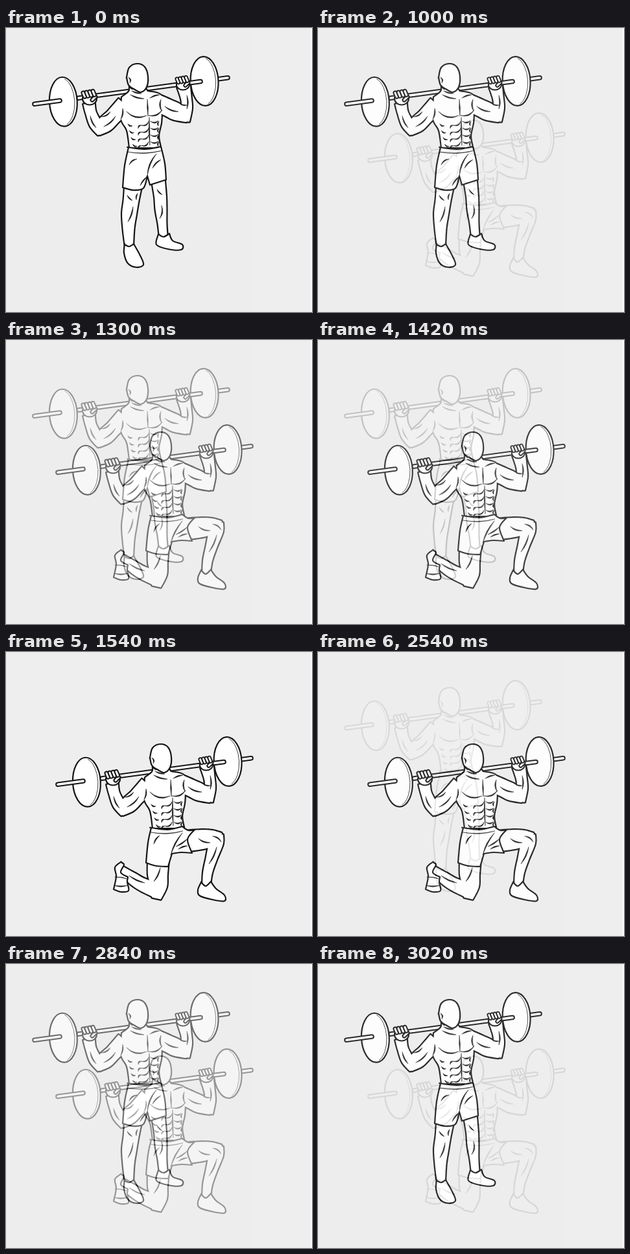
An HTML page that plays this animation: 472x438 px, repeating every 3080 ms.

```html
<!DOCTYPE html>
<html lang="en">
<head>
<meta charset="utf-8">
<title>Barbell lunge</title>
<style>
  html, body { margin: 0; width: 100%; height: 100%; overflow: hidden; background: #fff; }
  svg { display: block; width: 100%; height: 100%; }
</style>
</head>
<body>
<svg id="stage" viewBox="0 0 472 438" stroke-linecap="round" stroke-linejoin="round"></svg>
<script>
const LOOP = 3080, HOLD = 1000, STEP = 60, STEPS = 10, BACK = 2540;
const INK = '#161616', LINE = 2.2;

const parse = text => text.trim().split(/\s+/).map(p => p.split(',').map(Number));
const fixed = v => v.toFixed(1);

// Smooth path through points, continuing from the first one.
function through(pts) {
  return pts.slice(1).map((c, i) => {
    const b = pts[i], a = pts[i - 1] || b, d = pts[i + 2] || c;
    const c1 = b.map((v, k) => fixed(v + (c[k] - a[k]) / 6));
    const c2 = c.map((v, k) => fixed(v - (d[k] - b[k]) / 6));
    return `C${c1} ${c2} ${c.map(fixed)}`;
  }).join('');
}

// Closed outline through key points; "/" marks a sharp corner.
function outline(text) {
  const parts = text.split('/').map(parse);
  let last = parts[0][0], path = 'M' + last;
  for (const part of parts) {
    path += through([last, ...part]);
    last = part[part.length - 1];
  }
  return path + 'Z';
}

// Tapered limb from joints given as x,y,radius.
function limb(text) {
  const joints = parse(text);
  const side = sign => joints.map(([x, y, r], i) => {
    const p = joints[i - 1] || joints[i], n = joints[i + 1] || joints[i];
    const dx = n[0] - p[0], dy = n[1] - p[1];
    const k = sign * (r - LINE / 2) / Math.hypot(dx, dy);
    return [x - dy * k, y + dx * k];
  });
  const right = side(1), left = side(-1).reverse();
  return `M${right[0].map(fixed)}${through(right)}L${left[0].map(fixed)}${through(left)}Z`;
}

// Parts merged into one silhouette with a common contour.
const merge = (...parts) => {
  const d = parts.join('');
  return `<path d="${d}" fill="none" stroke="${INK}" stroke-width="${2 * LINE}"/>` +
    parts.map(p => `<path d="${p}" fill="#fff"/>`).join('');
};

const shape = text =>
  `<path d="${outline(text)}" fill="#fff" stroke="${INK}" stroke-width="${LINE}"/>`;

// Brush stroke, pointed at both ends.
function mark(x, y, dx, dy, bend = 0, weight = 1.7) {
  const len = Math.hypot(dx, dy);
  const ctrl = b => [dx / 2 - dy / len * b, dy / 2 + dx / len * b];
  const [a, b] = [ctrl(bend + weight), ctrl(bend - weight)];
  return `<path d="M${x} ${y}q${a.map(fixed)} ${dx} ${dy}q${fixed(b[0] - dx)} ${fixed(b[1] - dy)} ${-dx} ${-dy}"
    fill="${INK}" stroke="${INK}" stroke-width=".5"/>`;
}

const repeat = (n, draw) => Array.from({ length: n }, (_, i) => draw(i)).join('');

const capsule = (x, y, dx, dy, width) => [[INK, width], ['#fff', width - 2 * LINE + .4]].map(([color, w]) =>
  `<path d="M${x} ${y}l${dx} ${dy}" stroke="${color}" stroke-width="${w}"/>`).join('');

const SLOPE = -.136;
const bar = (from, to) => capsule(from, 117.3 + (from - 44) * SLOPE, to - from, (to - from) * SLOPE, 7.6);

const plate = (x, y) => `<g transform="translate(${x} ${y}) rotate(-3)" fill="none" stroke="${INK}">
  <ellipse rx="21.4" ry="38" fill="#fff" stroke-width="${LINE}"/>
  <path d="M4 -35A20 37 0 0 1 4 35" stroke-width=".8"/></g>`;

const hand = (x, y, size) => `<g transform="translate(${x} ${y}) scale(${size})">
  <ellipse cx="1" cy="3" rx="11" ry="9.5" fill="#fff" stroke="${INK}" stroke-width="${LINE}"/>
  ${capsule(5, 5, 5, -5, 7)}
  ${repeat(4, i => capsule(-9 + 5 * i, -6 - .9 * i, 2.5, 6, 7))}</g>`;

const muscles =
  mark(186, 129, 31, 6, 11) + mark(220, 135, 21, -9, 8) + mark(218, 110, 1, 26) +
  mark(192, 103, 21, 6, 3) + mark(222, 108, 15, -5, -2) +
  mark(177, 141, 3, -17, 3) + mark(240, 128, -1, -18, -4) +
  mark(147, 137, 14, -8, 4) + mark(151, 152, 18, -16, 4) + mark(130, 136, 9, 18, 3) +
  mark(245, 121, 21, 8, 4) + mark(269, 117, 10, 2, 2) + mark(279, 104, 0, 21, -3);

const abs =
  mark(221, 138, 1, 43, 1) +
  repeat(4, i => {
    const y = 144 + 10.5 * i;
    return mark(220, y, -11, 6, -6) + mark(223, y, 12, -1, 5) + mark(209, y + 6, -5, 5, 4) +
      mark(188 + 2.5 * i, y + 4, 7, 3, 3) + mark(236, y, -1, 7, 3);
  });

const upper =
  bar(112, 342) + plate(88.4, 113.7) + bar(44, 83) + plate(306.1, 82) + bar(270, 300) +
  merge(
    outline('191,90 190,98 179,107 / 178,140 187,158 191,184 / 238,184 / 235,166 239,146 240,128 / 239,104 218,98 / 213,90'),
    limb('183,118,14 166,136,13 152,150,13 143,164,3'),
    limb('128,116,10 131,131,9 138,148,10 146,163,6'),
    limb('232,115,14 250,123,14 264,130,14 281,140,7'),
    limb('274,90,11 278,109,9 279,124,9 277,144,7')) +
  muscles + abs +
  shape('186,76 190,61 202,55 214,60 219,75 217,91 208,99 197,94 189,88 186,76') +
  mark(189, 76, 2, 9, -4) + mark(190, 88, 6, 7, 2) + mark(194, 97, 15, 4, 2) +
  hand(128, 106, 1) + hand(272, 84, .92);

const standing =
  merge(limb('196,244,14 193,266,12.5 190,287,12 189,310,9.5 190,338,7')) +
  merge(limb('235,236,11 238,260,10 239,280,9.5 241,302,7.5 243,324,7')) +
  shape('183,334 182,347 188,363 201,369 212,365 207,351 197,333 / 190,337 183,334') +
  shape('235,318 232,334 250,341 270,342 272,334 257,328 252,317 / 243,322 235,318') +
  shape('189,184 214,187 239,183 / 245,209 247,234 / 222,242 / 218,228 / 212,247 196,250 180,246 / 183,212 189,184') +
  mark(187, 191, 54, -2, 6, .8) +
  mark(190, 211, 12, -9, -4) + mark(218, 228, 14, -34, -6) + mark(218, 229, -11, 14, 2) +
  mark(226, 216, 13, -13, -3) + mark(187, 258, 8, 8, 2) + mark(203, 255, -2, 10, 2) +
  mark(196, 276, -8, 23, -3) + mark(233, 249, 8, 8, 2) + mark(240, 274, -3, 20, -5);

const kneeling =
  merge(limb('235,320,17 234,344,16 236,362,13 232,380,8'), limb('234,368,13 211,359,11 195,349,10 178,335,6')) +
  shape('177,324 168,332 170,346 166,366 / 177,370 189,368 187,355 188,347 / 177,340 182,328 177,324') +
  mark(168, 347, 19, 3, -2, .8) + mark(167, 360, 20, 0, 3) +
  merge(limb('275,292,17 303,289,16 320,287,13 333,286,8'), limb('325,281,11 324,294,12 317,318,9.5 311,340,8 309,360,7')) +
  shape('301,355 296,367 299,376 319,382 337,384 337,375 324,365 316,354 / 308,361 301,355') +
  shape('224,271 249,274 272,269 / 281,275 291,274 / 280,289 287,310 / 270,309 256,311 / 250,331 / 232,330 216,325 / 219,294 224,271') +
  mark(223, 278, 50, -2, 6, .8) +
  mark(228, 296, 9, -13, -3) + mark(272, 279, -18, 34, 4) + mark(280, 288, -18, 12, -2) +
  mark(266, 304, 14, -5, -2) + mark(238, 333, -10, 21, -3) + mark(190, 345, 24, 11, 3) +
  mark(297, 288, 18, 6, 4) + mark(319, 284, 13, 9, -4) + mark(325, 301, -12, 26, -3);

const backdrop = (right, color) => `<path d="M0 0H${right}V438H0Z" fill="${color}"/>`;

const stage = document.getElementById('stage');
stage.innerHTML = `
  <g>${backdrop(470, '#eee')}${backdrop(381, '#ededed')}${upper}${standing}</g>
  <g id="lunge">${backdrop(470, '#eee')}<g transform="translate(36 87)">${upper}</g>${kneeling}</g>`;
const lunge = document.getElementById('lunge');

// Stepped ramp from 0 to 1.
const fade = (t, from) =>
  t < from ? 0 : Math.min(STEPS, Math.floor((t - from) / STEP) + 1) / STEPS;

function draw(now) {
  const t = now % LOOP;
  lunge.setAttribute('opacity', fade(t, HOLD) - fade(t, BACK));
}

const start = performance.now();
function tick() {
  draw(performance.now() - start);
  requestAnimationFrame(tick);
}
draw(0);
requestAnimationFrame(tick);
</script>
</body>
</html>
```
